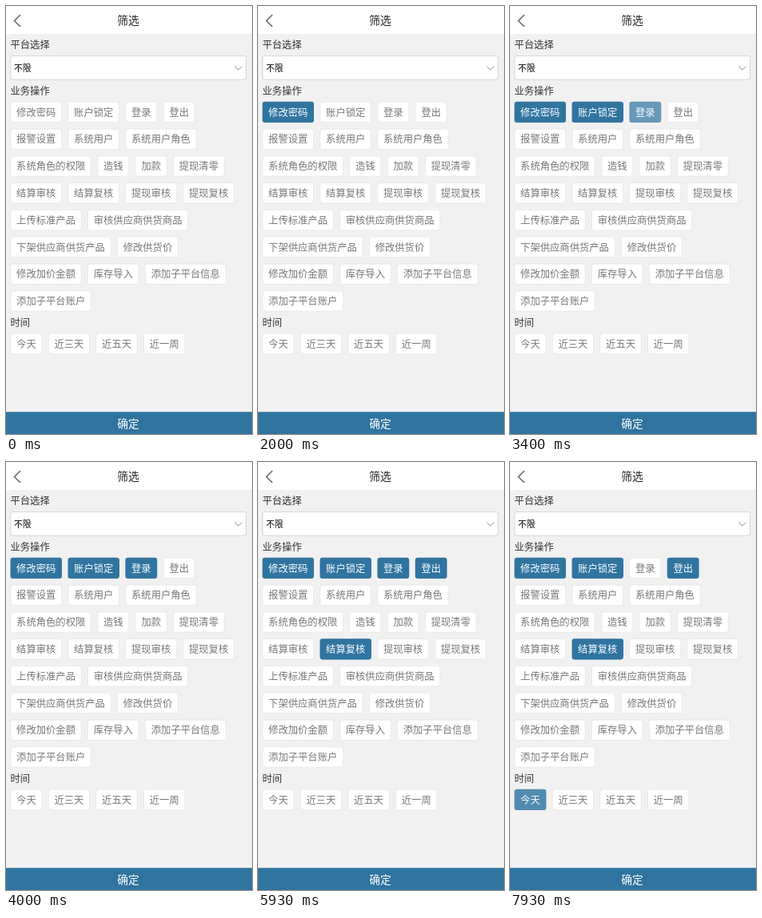
Recreate the animation shown at these times as an HTML page with a canvas. Size 308x536 px, loop 8000 ms.

```html
<!DOCTYPE html>
<html lang="zh-CN">
<head>
<meta charset="utf-8">
<title>筛选</title>
<style>
  html, body { margin: 0; width: 100%; height: 100%; overflow: hidden; background: #f1f1f1; }
  canvas { display: block; width: 308px; height: 536px; }
</style>
</head>
<body>
<canvas id="stage"></canvas>
<script>
const W = 308, H = 536, LOOP = 8000, FADE = 300;
const FONT = '"Noto Sans CJK SC", "Noto Sans CJK", sans-serif';
const SIZE = 12.32, PAD = 7.6, GAP = 7.5, LEFT = 5.5;
const CHIP_H = 26.2, PITCH = 33.8, BORDER = .8;
const WHITE = [255, 255, 255], EDGE = [231, 231, 231], BLUE = [48, 116, 160];

const canvas = document.getElementById('stage');
const dpr = window.devicePixelRatio || 1;
canvas.width = W * dpr;
canvas.height = H * dpr;
const ctx = canvas.getContext('2d');
ctx.scale(dpr, dpr);

const actionRows = [
  '修改密码 账户锁定 登录 登出',
  '报警设置 系统用户 系统用户角色',
  '系统角色的权限 造钱 加款 提现清零',
  '结算审核 结算复核 提现审核 提现复核',
  '上传标准产品 审核供应商供货商品',
  '下架供应商供货产品 修改供货价',
  '修改加价金额 库存导入 添加子平台信息',
  '添加子平台账户'
];
const timeRow = '今天 近三天 近五天 近一周';

// Times at which each chip is toggled.
const taps = {
  '修改密码': [1480],
  '账户锁定': [2490],
  '登录': [3270, 6900],
  '登出': [4270],
  '结算复核': [5300],
  '今天': [7770]
};

function layoutRow(row, cy) {
  let x = LEFT;
  return row.split(' ').map(label => {
    const w = label.length * SIZE + PAD * 2;
    const chip = { label, x, w, cy };
    x += w + GAP;
    return chip;
  });
}
const chips = actionRows.flatMap((row, i) => layoutRow(row, 132.9 + i * PITCH))
  .concat(layoutRow(timeRow, 422.9));

// CSS "ease": cubic-bezier(.25, .1, .25, 1)
function ease(p) {
  if (p <= 0) return 0;
  if (p >= 1) return 1;
  const bez = (a, b, u) => 3 * a * u * (1 - u) ** 2 + 3 * b * u * u * (1 - u) + u ** 3;
  let lo = 0, hi = 1;
  for (let i = 0; i < 20; i++) {
    const mid = (lo + hi) / 2;
    if (bez(.25, .25, mid) < p) lo = mid; else hi = mid;
  }
  return bez(.1, 1, lo);
}

function chipState(label, t) {
  let on = false, level = 0;
  for (const tap of taps[label] || []) {
    if (t < tap) break;
    on = !on;
    const k = ease((t - tap) / FADE);
    level = on ? k : 1 - k;
  }
  return { on, level };
}

function mix(a, b, k) {
  return 'rgb(' + a.map((v, i) => Math.round(v + (b[i] - v) * k)).join(',') + ')';
}

function text(str, x, cy, size, color, align = 'left', weight = 400) {
  ctx.font = `${weight} ${size}px ${FONT}`;
  ctx.textAlign = align;
  ctx.fillStyle = color;
  ctx.fillText(str, x, cy + size * .38);
}

function fillBox(x, y, w, h, r, color) {
  ctx.beginPath();
  ctx.roundRect(x, y, w, h, r);
  ctx.fillStyle = color;
  ctx.fill();
}

function borderedBox(x, y, w, h, edge, fill) {
  fillBox(x, y, w, h, 3.3, edge);
  fillBox(x + BORDER, y + BORDER, w - BORDER * 2, h - BORDER * 2, 2.5, fill);
}

function chevron(points, color, width) {
  ctx.beginPath();
  points.forEach(([x, y]) => ctx.lineTo(x, y));
  ctx.strokeStyle = color;
  ctx.lineWidth = width;
  ctx.stroke();
}

function drawChip({ label, x, w, cy }, t) {
  const { on, level } = chipState(label, t);
  borderedBox(x, cy - CHIP_H / 2, w, CHIP_H, mix(EDGE, BLUE, level), mix(WHITE, BLUE, level));
  text(label, x + PAD, cy, SIZE, on ? '#fff' : '#777');
}

function drawPage() {
  ctx.fillStyle = '#f1f1f1';
  ctx.fillRect(0, 0, W, H);

  ctx.fillStyle = '#fff';
  ctx.fillRect(0, 0, W, 35);
  chevron([[18, 11], [10.5, 18.5], [18, 26]], '#666', 1.5);
  text('筛选', 153, 18, 13.8, '#222', 'center', 500);

  text('平台选择', 5.5, 48.5, SIZE, '#333');
  borderedBox(5.5, 62, 295.5, 30.5, '#ccc', '#fff');
  text('不限', 10, 77.5, 10.8, '#000');
  chevron([[286.5, 75.5], [291, 80], [295.5, 75.5]], '#999', 1);

  text('业务操作', 5.5, 106, SIZE, '#333');
  text('时间', 5.5, 396, SIZE, '#333');

  ctx.fillStyle = mix(BLUE, BLUE, 0);
  ctx.fillRect(0, 508.3, W, H - 508.3);
  text('确定', 153, 523, 13.8, '#fff', 'center');
}

const start = performance.now();
function frame(now) {
  const t = Math.max(0, now - start) % LOOP;
  drawPage();
  chips.forEach(chip => drawChip(chip, t));
  requestAnimationFrame(frame);
}
frame(start);
</script>
</body>
</html>
```
